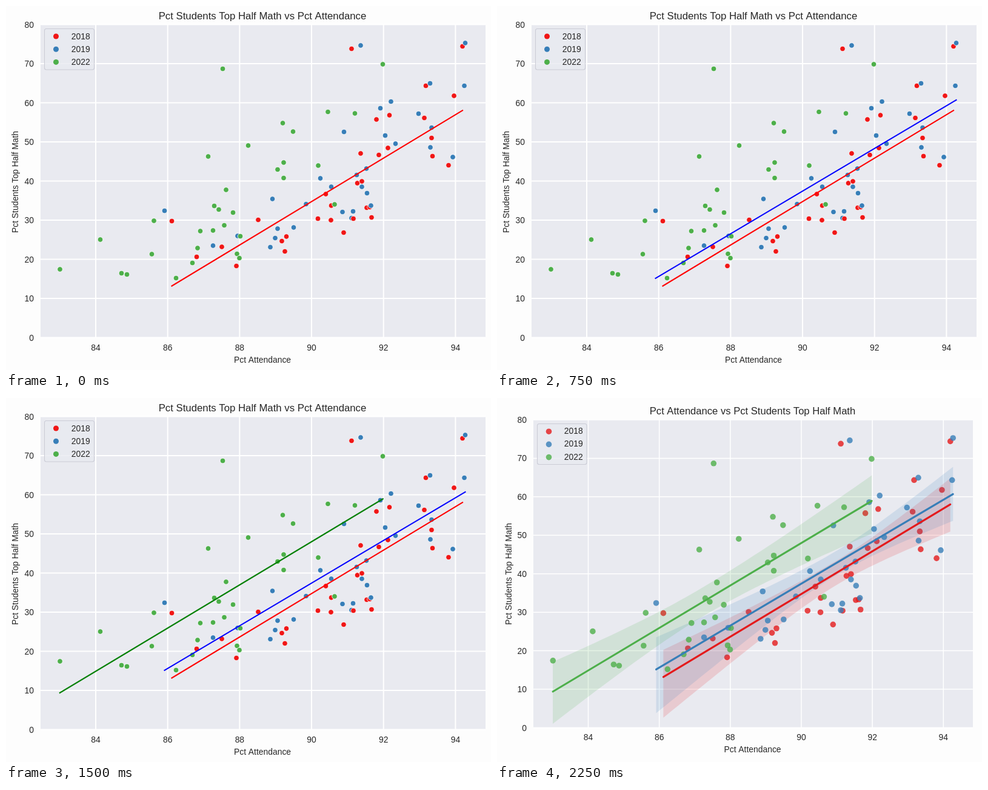
An HTML page with a canvas that plays this animation: 800 by 600 pixels, repeating every 3 s.

```html
<!DOCTYPE html>
<html lang="en">
<head>
<meta charset="utf-8">
<title>Attendance and math</title>
<style>
  html, body { margin: 0; width: 100%; height: 100%; overflow: hidden; background: #fdfdfd; }
  canvas { display: block; }
</style>
</head>
<body>
<canvas id="stage" width="800" height="600"></canvas>
<script>
const ctx = document.getElementById('stage').getContext('2d');
const FONT = '"Liberation Sans", Arial, sans-serif';
const INK = '#262626', PANEL = '#e9eaf0';
const STEP = 750;

// Points are x, y pairs in the pixel space of the first chart.
// band: centre x, half width there, and [start, end] half widths above and below.
const series = [
  {
    year: '2018', dot: '#f01616', soft: '#e41a1c', stroke: '#ff0000',
    line: [273.5, 461.5, 753, 172.2],
    band: { mid: 560, min: 20, up: [45, 43], down: [67, 45] },
    points: [753, 66.5, 570, 70.5, 692.5, 131.5, 739, 148, 690, 184.5, 632.5, 180, 611, 187,
      702, 217.5, 703.5, 247.5, 730, 262.5, 630, 234, 615, 245.5, 585, 243, 579.5, 292,
      587, 289, 527.5, 310, 536.5, 329, 595, 332.5, 600, 331.5, 603, 348.5, 514.5, 350.5,
      536, 353, 557, 373.5, 416, 352.5, 462.5, 380, 455, 387.5, 460, 404.5, 356, 397,
      314.5, 413.5, 380, 428.5, 273.5, 354.5, 573, 350.5],
  },
  {
    year: '2019', dot: '#377eb8', soft: '#377eb8', stroke: '#0000ff',
    line: [261.5, 448.8, 757.5, 155],
    band: { mid: 560, min: 20, up: [53, 45], down: [72, 44] },
    points: [757.5, 61, 585, 65, 699.5, 127.5, 756, 131.5, 635, 157.5, 617.5, 168.5,
      680.5, 177.5, 557.5, 207.5, 625.5, 213.5, 702, 200.5, 700, 233, 737, 249, 642.5, 227,
      594.5, 268, 578.5, 278.5, 518.5, 284, 536.5, 298, 587, 298, 595.5, 308.5, 495, 326.5,
      439.5, 318, 555, 339.5, 572.5, 338.5, 570, 349.5, 602, 329, 474.5, 365, 448, 367,
      444, 382.5, 436, 397.5, 382, 379, 341.5, 395, 261.5, 337.5],
  },
  {
    year: '2022', dot: '#4daf4a', soft: '#4daf4a', stroke: '#008000',
    line: [88.8, 486, 621.7, 166.3],
    band: { mid: 340, min: 24, up: [49, 42], down: [53, 54] },
    points: [357.5, 103.5, 621.5, 96, 531, 174.5, 575.5, 177, 456.5, 193, 473.5, 207,
      399.5, 230, 333.5, 248, 458, 258, 515, 263, 448, 269.5, 458, 283.5, 363, 303,
      343.5, 329.5, 351, 335.5, 374.5, 340.5, 542, 327, 360, 361.5, 320.5, 371, 341.5, 370,
      386.5, 379.5, 316, 399, 381, 408.5, 385, 415.5, 307.5, 423.5, 280.5, 448.5, 244, 354,
      155.5, 385, 240.5, 409, 190.5, 440.5, 199.5, 442.5, 89, 434],
  },
];

// x84 and y0 locate the values 84 and 0; dx and dy are pixels per unit.
const plain = {
  left: 57, right: 791, top: 30.5, x84: 148, dx: 59.34, y0: 546.5, dy: 6.45, grid: 2,
  title: 'Pct Students Top Half Math vs Pct Attendance', titleY: 22, titleSize: 16.75,
  tickY: 567.5, labelY: 588, tickX: 46, sideX: 20,
  legend: [63.5, 37.5, 82, 67.5], key: [82.5, 50], textDy: 5,
};
const banded = {
  left: 60, right: 785, top: 36, x84: 150.5, dx: 58.58, y0: 543.5, dy: 6.344, grid: 1.5,
  title: 'Pct Attendance vs Pct Students Top Half Math', titleY: 27, titleSize: 16.6,
  tickY: 563.5, labelY: 584, tickX: 49, sideX: 24,
  legend: [66.5, 42.5, 81.5, 67], key: [85.5, 55.2], textDy: 4,
};

const mapX = (view, x) => view.x84 + (x - plain.x84) * view.dx / plain.dx;
const mapY = (view, y) => view.y0 + (y - plain.y0) * view.dy / plain.dy;

function text(str, x, y, align = 'center', size = 13.89) {
  ctx.font = `${size}px ${FONT}`;
  ctx.fillStyle = INK;
  ctx.textAlign = align;
  ctx.fillText(str, x, y);
}

function segment(x1, y1, x2, y2, color, width, cap = 'butt') {
  ctx.strokeStyle = color;
  ctx.lineWidth = width;
  ctx.lineCap = cap;
  ctx.beginPath();
  ctx.moveTo(x1, y1);
  ctx.lineTo(x2, y2);
  ctx.stroke();
}

function disc(x, y, r, color, edge) {
  ctx.beginPath();
  ctx.arc(x, y, r, 0, 2 * Math.PI);
  ctx.fillStyle = color;
  ctx.fill();
  if (!edge) return;
  ctx.strokeStyle = edge;
  ctx.lineWidth = 0.8;
  ctx.stroke();
}

function drawAxes(view) {
  const { left, right, top, y0 } = view;
  ctx.fillStyle = '#fdfdfd';
  ctx.fillRect(0, 0, 800, 600);
  ctx.fillStyle = PANEL;
  ctx.fillRect(left, top, right - left, y0 - top);
  for (let v = 84; v <= 94; v += 2) {
    const x = view.x84 + (v - 84) * view.dx;
    segment(x, top, x, y0, '#fff', view.grid);
    text(v, x, view.tickY);
  }
  for (let v = 0; v <= 80; v += 10) {
    const y = y0 - v * view.dy;
    segment(left, y, right, y, '#fff', view.grid);
    text(v, view.tickX, y + 5, 'right');
  }
  const middle = (left + right) / 2;
  text(view.title, middle - 1, view.titleY, 'center', view.titleSize);
  text('Pct Attendance', middle - 1, view.labelY);
  ctx.save();
  ctx.translate(view.sideX, 290);
  ctx.rotate(-Math.PI / 2);
  text('Pct Students Top Half Math', 0, 0);
  ctx.restore();
}

function drawLegend(view, drawKey) {
  ctx.beginPath();
  ctx.roundRect(...view.legend, 3);
  ctx.fillStyle = 'rgba(233,234,240,.8)';
  ctx.fill();
  ctx.strokeStyle = '#cbccd6';
  ctx.lineWidth = 1.1;
  ctx.stroke();
  const [x, y] = view.key;
  series.forEach((s, i) => {
    drawKey(s, x, y + i * 21.2);
    text(s.year, x + 25.3, y + i * 21.2 + view.textDy, 'left');
  });
}

function eachPoint(view, points, draw) {
  for (let i = 0; i < points.length; i += 2) {
    draw(mapX(view, points[i]), mapY(view, points[i + 1]));
  }
}

function fitLine(view, line) {
  return line.map((v, i) => (i % 2 ? mapY : mapX)(view, v));
}

function drawPlain(lineCount) {
  drawAxes(plain);
  const dots = (s, points) =>
    eachPoint(plain, points, (x, y) => disc(x, y, 4.3, s.dot, '#fff'));
  series.forEach(s => dots(s, s.points));
  dots(series[0], series[0].points.slice(-2));
  series.slice(0, lineCount).forEach(s => segment(...s.line, s.stroke, 2.1, 'square'));
  drawLegend(plain, (s, x, y) => disc(x, y, 4.5, s.dot));
}

function drawBand({ mid, min, up, down }, [x1, y1, x2, y2]) {
  const edge = (x, [start, end]) => {
    const [spread, reach] = x < mid ? [start, x1 - mid] : [end, x2 - mid];
    return Math.sqrt(min ** 2 + (spread ** 2 - min ** 2) * ((x - mid) / reach) ** 2);
  };
  const n = 60;
  const at = i => x1 + (x2 - x1) * i / n;
  const fit = x => y1 + (y2 - y1) * (x - x1) / (x2 - x1);
  ctx.beginPath();
  for (let i = 0; i <= n; i++) ctx.lineTo(at(i), fit(at(i)) - edge(at(i), up));
  for (let i = n; i >= 0; i--) ctx.lineTo(at(i), fit(at(i)) + edge(at(i), down));
  ctx.fill();
}

function drawBanded() {
  drawAxes(banded);
  const dot = (s, x, y) => {
    ctx.globalAlpha = 0.8;
    disc(x, y, 4.8, s.soft);
    ctx.globalAlpha = 1;
  };
  series.forEach(s => {
    eachPoint(banded, s.points, (x, y) => dot(s, x, y));
    ctx.globalAlpha = 0.15;
    ctx.fillStyle = s.soft;
    drawBand(s.band, fitLine(banded, s.line));
    ctx.globalAlpha = 1;
  });
  series.forEach(s => segment(...fitLine(banded, s.line), s.soft, 3.1, 'round'));
  drawLegend(banded, dot);
}

function frame() {
  const step = Math.floor(performance.now() / STEP) % 4;
  if (step < 3) drawPlain(step + 1);
  else drawBanded();
  requestAnimationFrame(frame);
}
frame();
</script>
</body>
</html>
```
